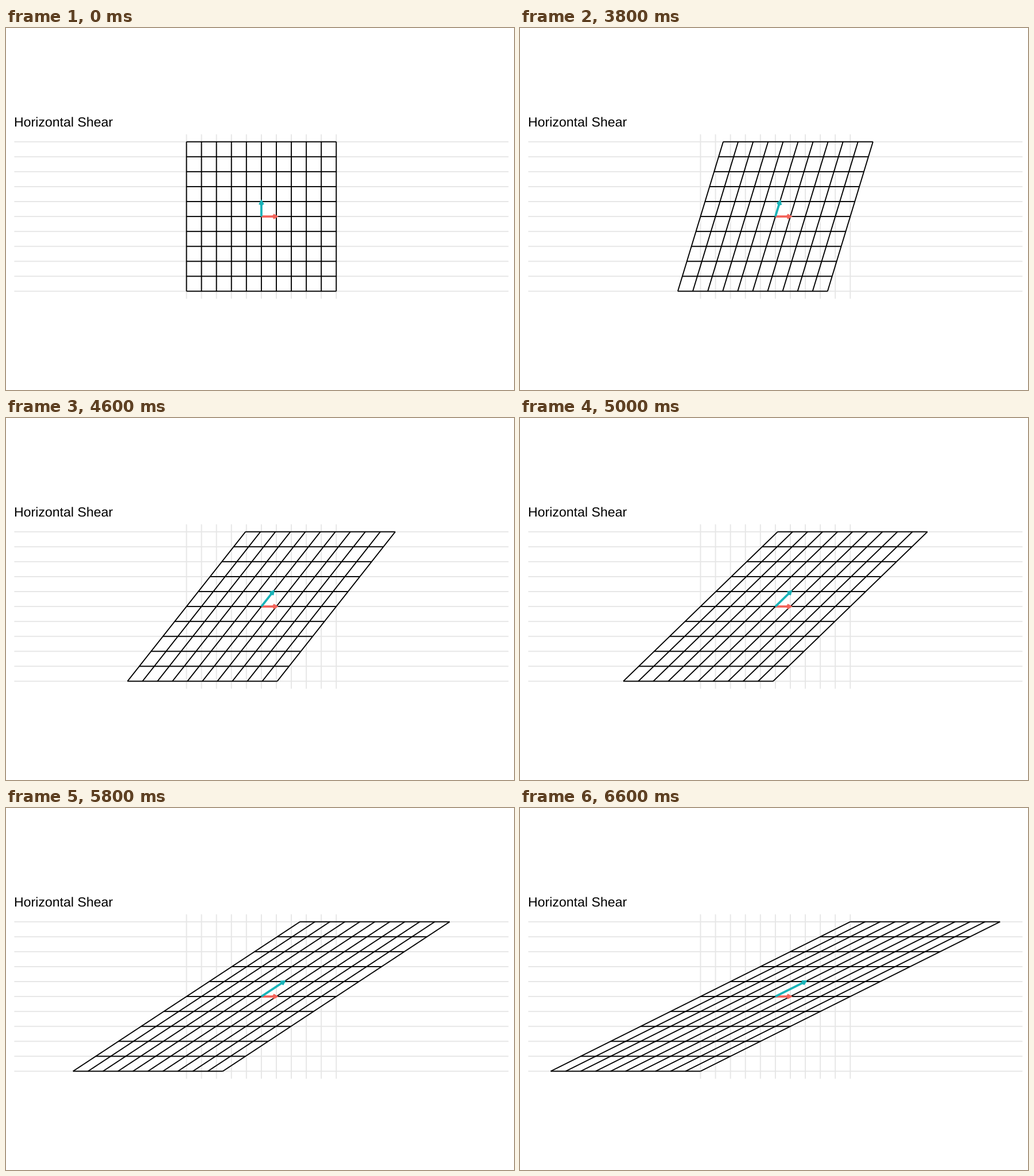
Write a matplotlib script that moves like this. It is 885 by 632 pixels and loops after 10000 ms.

```python
import numpy as np
import matplotlib.pyplot as plt
from matplotlib.animation import FuncAnimation
from matplotlib.collections import LineCollection

plt.rcParams["text.hinting"] = "none"

WIDTH, HEIGHT, DPI = 885, 632, 64
PT = 72 / DPI                  # points per pixel
CX, CY, UNIT = 444.9, 329.1, 26.09
THIN, THICK = 1.88, 3.8        # line widths in pixels
HEAD = 6.3 / UNIT              # arrowhead edge length
FRAMES, STEPS, MAX_SHEAR = 100, 33, 2.0
TICKS = np.arange(-5, 6)

fig = plt.figure(figsize=(WIDTH / DPI, HEIGHT / DPI), dpi=DPI, facecolor="white")
ax = fig.add_axes([0, 0, 1, 1])
ax.set_xlim(-CX / UNIT, (WIDTH - CX) / UNIT)
ax.set_ylim((CY - HEIGHT) / UNIT, CY / UNIT)
ax.axis("off")


def lattice(half_width, half_height):
    """Segments through every tick, reaching out to the given half sizes."""
    rows = [[(-half_width, t), (half_width, t)] for t in TICKS]
    cols = [[(t, -half_height), (t, half_height)] for t in TICKS]
    return np.array(rows + cols, dtype=float)


def add_lines(segments, color, zorder):
    lines = LineCollection(segments, colors=color, linewidths=THIN * PT,
                           capstyle="butt", zorder=zorder)
    lines.set_snap(False)
    ax.add_collection(lines, autolim=False)
    return lines


def add_arrow(color, zorder):
    line, = ax.plot([], [], color=color, lw=THICK * PT, zorder=zorder,
                    solid_capstyle="butt", solid_joinstyle="miter",
                    scalex=False, scaley=False)
    line.set_snap(False)
    return line


def arrow_points(x, y):
    """Shaft from the origin to (x, y), then an open head, split by a gap."""
    back = np.arctan2(y, x) + np.pi
    a, b = back - np.pi / 6, back + np.pi / 6
    xs = [0, x, np.nan, x + HEAD * np.cos(a), x, x + HEAD * np.cos(b)]
    ys = [0, y, np.nan, y + HEAD * np.sin(a), y, y + HEAD * np.sin(b)]
    return xs, ys


square = lattice(5, 5)
add_lines(lattice(16.5, 5.5), "#E6E6E6", 1)
grid = add_lines(square, "black", 2)
x_arrow = add_arrow("#F3635A", 3)
y_arrow = add_arrow("#19B3B8", 4)
x_arrow.set_data(*arrow_points(1, 0))
ax.text((14.4 - CX) / UNIT, (CY - 172) / UNIT, "Horizontal Shear",
        family="Liberation Sans", size=23.18 * PT, color="black",
        ha="left", va="baseline")


def update(frame):
    step = min(max(frame - STEPS, 0), STEPS)
    shear = MAX_SHEAR * step / STEPS
    sheared = square.copy()
    sheared[..., 0] += shear * square[..., 1]
    grid.set_segments(sheared)
    y_arrow.set_data(*arrow_points(shear, 1))
    return grid, y_arrow


anim = FuncAnimation(fig, update, frames=FRAMES, interval=100,
                     repeat=True, repeat_delay=0, blit=False)
plt.show()
```
